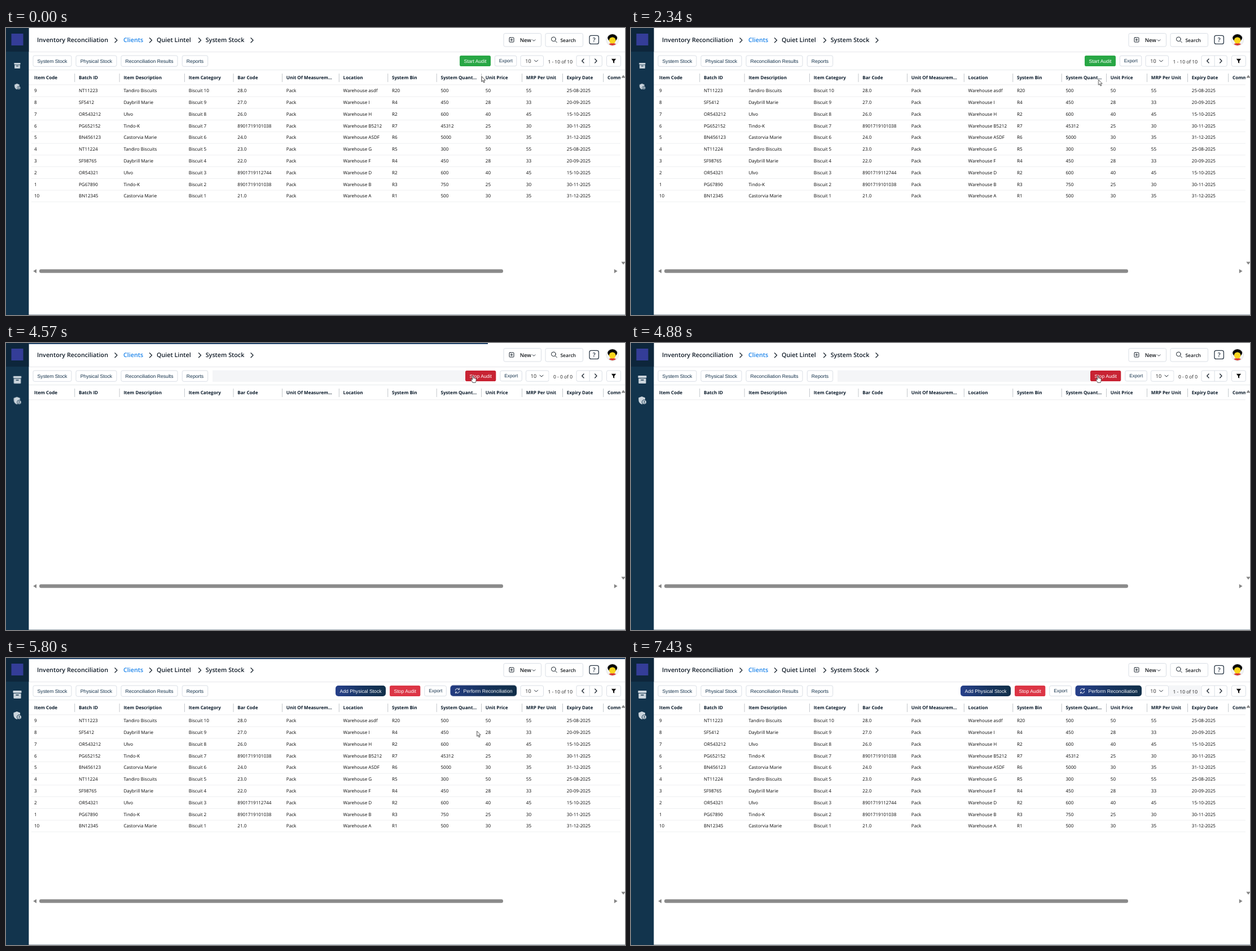
An HTML page for the animation above (7.99 s loop, 1097 by 510 pixels).

```html
<!DOCTYPE html>
<html lang="en">
<head>
<meta charset="utf-8">
<title>Inventory Reconciliation</title>
<style>
html, body { margin: 0; width: 100%; height: 100%; overflow: hidden; background: #fff; }
svg { display: block; width: 100vw; height: 100vh; }
text { font-family: "Open Sans", "Noto Sans", sans-serif; text-rendering: geometricPrecision; fill: #14181c; white-space: pre; }
.cell { font-size: 8.08px; font-weight: 500; fill: #080808; }
.head { font-size: 8.1px; font-weight: 700; fill: #0a1a2a; }
.crumb { font-size: 10.78px; font-weight: 600; fill: #0f1a26; }
.link { fill: #1c84ea; }
.new { font-size: 9.4px; font-weight: 600; }
.search { font-size: 8.5px; font-weight: 600; }
.help { font-size: 11px; font-weight: 600; fill: #2b3947; text-anchor: middle; }
.count { font-size: 8.45px; fill: #222; }
.size { font-size: 9px; fill: #222; text-anchor: middle; }
.btn, .btn-s { font-family: "Liberation Sans", Arial, sans-serif; font-size: 8.67px; text-anchor: middle; fill: #12304a; }
.btn-s { font-size: 8.3px; }
.lit { fill: #fff; }
.end { text-anchor: end; }
.box { fill: #fff; stroke: #d5dbe2; stroke-width: .9; }
.ico { fill: none; stroke: #1c2630; stroke-width: 1.3; stroke-linecap: round; stroke-linejoin: round; }
.thin { stroke-width: 1; }

.idle, .empty, .audit, .rows, .hand, .arrow, .ring, .patch { animation: 7990ms step-end infinite; }
.idle { animation-name: idle; }
.empty { animation-name: empty; }
.audit { animation-name: audit; }
.rows { animation-name: rows; }
.hand { animation-name: hand; }
.arrow { animation-name: arrow; }
.ring { animation-name: ring; }
.patch { animation-name: patch; }
.start { animation: start 7990ms linear infinite; }
.cursor { animation: cursor 7990ms linear infinite; }
.bar { transform-origin: 40px 0; animation: bar 7990ms linear infinite; }
.shift { animation: shift 7990ms step-end infinite; }
.export { animation: export 7990ms step-end infinite; }
.lift { animation: lift 7990ms linear infinite; }
.dim { animation: dim 7990ms linear infinite; }
.icon { animation: grow 7990ms ease-in-out infinite; }

@keyframes idle { 0% { visibility: visible } 56.32%, 100% { visibility: hidden } }
@keyframes empty { 0% { visibility: hidden } 56.32% { visibility: visible } 62.08%, 100% { visibility: hidden } }
@keyframes audit { 0% { visibility: hidden } 62.08%, 100% { visibility: visible } }
@keyframes rows { 0% { visibility: visible } 56.32% { visibility: hidden } 62.08%, 100% { visibility: visible } }
@keyframes ring { 0% { visibility: hidden } 48.94% { visibility: visible } 56.32%, 100% { visibility: hidden } }
@keyframes patch { 0% { visibility: hidden } 74.34%, 100% { visibility: visible } }
@keyframes shift { 0% { transform: none } 56.32% { transform: translateX(9.5px) } 62.08%, 100% { transform: none } }
@keyframes export { 0% { transform: none } 56.32% { transform: translateX(9.5px) } 62.08%, 100% { transform: translateX(-124.5px) } }
@keyframes hand {
  0% { visibility: hidden } 2.38% { visibility: visible } 7.38% { visibility: hidden }
  31.79% { visibility: visible } 71.7%, 100% { visibility: hidden }
}
@keyframes arrow {
  0% { visibility: visible } 2.38% { visibility: hidden } 7.38% { visibility: visible }
  31.79% { visibility: hidden } 71.7%, 100% { visibility: visible }
}
@keyframes start {
  0%, 2.3% { fill: #28a745 } 3.3%, 7.3% { fill: #218838 } 9.2%, 31.7% { fill: #28a745 }
  33.5%, 100% { fill: #218838 }
}
@keyframes cursor {
  0%, .63% { transform: translate(843px, 86px) }
  3.25%, 6.63% { transform: translate(833px, 60px) }
  9.26%, 28.91% { transform: translate(829px, 99px) }
  29.29% { transform: translate(828.5px, 92px) }
  33.54%, 71.46% { transform: translate(827.5px, 58px) }
  72.59% { transform: translate(834.5px, 129.5px) }
  74.34%, 80.1% { transform: translate(838px, 168px); animation-timing-function: ease-in-out }
  86.11%, 89.49% { transform: translate(980px, 481px) }
  92.86%, 100% { transform: translate(1052px, 513px) }
}
@keyframes bar {
  0%, 51.31% { transform: scaleX(0); opacity: 1 }
  56.32% { transform: scaleX(.7); opacity: 1 }
  60% { transform: scaleX(.99); opacity: 1 }
  60.8% { transform: scaleX(.99); opacity: 0 }
  60.81%, 61.7% { transform: scaleX(0); opacity: 1 }
  63.95% { transform: scaleX(.313); opacity: 1 }
  67.5% { transform: scaleX(.72); opacity: 1 }
  71.09% { transform: scaleX(.99); opacity: 1 }
  71.84%, 73.2% { transform: none; opacity: 1 }
  74.34%, 100% { transform: none; opacity: 0 }
}
@keyframes lift {
  0%, 62.08% { transform: none; filter: drop-shadow(0 0 0 #27408b00) }
  63.6%, 71.7% { transform: translateY(-1px); filter: drop-shadow(0 3px 4px #27408b80) }
  73%, 100% { transform: none; filter: drop-shadow(0 0 0 #27408b00) }
}
@keyframes dim { 0%, 62.08% { opacity: 0 } 63.6%, 71.7% { opacity: .35 } 73%, 100% { opacity: 0 } }
@keyframes grow {
  0%, 53.8% { transform: translateY(2px) scale(.74) }
  58.8%, 100% { transform: none }
}
</style>
</head>
<body>
<svg id="stage" viewBox="0 0 1097 510" preserveAspectRatio="none"></svg>
<script>
const text = (x, y, s, cls) => `<text x="${x}" y="${y}" class="${cls}">${s}</text>`;
const rect = (x, y, w, h, attrs) => `<rect x="${x}" y="${y}" width="${w}" height="${h}" ${attrs}/>`;
const path = (d, attrs = 'class="ico"') => `<path d="${d}" ${attrs}/>`;
const group = (cls, body) => `<g class="${cls}">${body}</g>`;
const box = (x, y, w, h) => rect(x, y, w, h, 'rx="2.8" class="box"');
const button = (x, w, s) => box(x, 49, w, 19.3) + text(x + w / 2, 61.7, s, 'btn');
const solid = (x, w, s, attrs) => rect(x, 49, w, 19, attrs) + text(x + w / 2, 61.6, s, 'btn lit');
const right = (x, y) => path(`M${x - 2} ${y - 4}l4 4l-4 4`);
const down = (x, y, r) => path(`M${x - r} ${y - r / 2}l${r} ${r}l${r} ${-r}`, 'class="ico thin"');

const columns = [
  [50, 'Item Code'], [129, 'Batch ID'], [208.4, 'Item Description'], [323.7, 'Item Category'],
  [410.3, 'Bar Code'], [496.8, 'Unit Of Measurem...'], [597.6, 'Location'], [684, 'System Bin'],
  [770.5, 'System Quant...'], [849.8, 'Unit Price'], [921.8, 'MRP Per Unit'], [993.8, 'Expiry Date'], [1066, 'Comments']
];
const products = {
  NT: ['Tandiro Biscuits', 50, 55, '25-08-2025'],
  SF: ['Daybrill Marie', 28, 33, '20-09-2025'],
  OR: ['Ulvo', 40, 45, '15-10-2025'],
  PG: ['Tindo-K', 25, 30, '30-11-2025'],
  BN: ['Castorvia Marie', 30, 35, '31-12-2025']
};
// item, batch, bar code, warehouse, bin, quantity
const stock = [
  '9 NT11223 28.0 asdf R20 500', '8 SF5412 27.0 I R4 450', '7 OR543212 26.0 H R2 600',
  '6 PG652152 8901719101038 B5212 R7 45312', '5 BN456123 24.0 ASDF R6 5000',
  '4 NT11224 23.0 G R5 300', '3 SF98765 22.0 F R4 450', '2 OR54321 8901719112744 D R2 600',
  '1 PG67890 8901719101038 B R3 750', '10 BN12345 21.0 A R1 500'
];

function tableHead() {
  const cells = columns.map(([x, s], i) =>
    text(x, 91.1, s, 'head') + (i ? rect(x - 7.8, 81, 1, 15, 'fill="#c3c7cb"') : '')).join('');
  return `<g clip-path="url(#table)">${cells}</g>` + rect(40, 100.5, 1049, .8, 'fill="#e6e8ea"');
}

function tableRow(line, i) {
  const [item, batch, code, place, bin, qty] = line.split(' ');
  const [name, price, mrp, date] = products[batch.slice(0, 2)];
  const cells = [item, batch, name, 'Biscuit ' + (10 - i), code, 'Pack', 'Warehouse ' + place, bin, qty, price, mrp, date];
  const y = 114.4 + i * 20.77;
  return cells.map((s, c) => text(columns[c][0], y, s, 'cell')).join('')
    + rect(45, y + 7.2, 1044, .8, 'fill="#e9ebed"');
}

const defs = `<defs>
  <clipPath id="table"><rect x="40" y="75" width="1049" height="30"/></clipPath>
  <clipPath id="face"><circle cx="1074.7" cy="21" r="10"/></clipPath>
  <linearGradient id="navy"><stop stop-color="#27408b"/><stop offset=".55" stop-color="#17345f"/><stop offset="1" stop-color="#12304a"/></linearGradient>
</defs>`;

const icon = (x, y, body) => `<g transform="translate(${x} ${y})">${group('icon', body)}</g>`;
const sidebar = rect(0, 0, 40.4, 510, 'fill="#12344d"') + rect(0, 0, 40.4, 42, 'fill="#0d263b"')
  + rect(9.5, 10, 21, 21, 'fill="#343d98"')
  + icon(20, 65, rect(-7.5, -7, 15, 4, 'rx=".8" fill="#cbd5dd"')
    + path('M-6.6 -2H6.6V6Q6.6 7 5.6 7H-5.6Q-6.6 7 -6.6 6Z', 'fill="#cbd5dd"')
    + rect(-2.6, 0, 5.2, 1.5, 'fill="#12344d"'))
  + icon(20, 102, path('M-.8 -7L5 -4.8V-1Q5 4.7 -.8 7Q-6.6 4.7 -6.6 -1V-4.8Z', 'fill="#cbd5dd"')
    + '<circle cx="3.6" cy="3" r="4" fill="#cbd5dd" stroke="#12344d"/><circle cx="3.6" cy="2" r="1.1" fill="#12344d"/>'
    + path('M1.6 5Q3.6 2.8 5.6 5Z', 'fill="#12344d"'));

const avatar = '<circle cx="1074.7" cy="21" r="11" fill="#f4f4f4" stroke="#dfe3e7" stroke-width=".8"/><g clip-path="url(#face)">'
  + '<ellipse cx="1074.7" cy="17.5" rx="8.5" ry="6.8" fill="#090909"/><ellipse cx="1074.7" cy="22" rx="5.8" ry="6" fill="#f9d51e"/>'
  + path('M1068.5 19Q1074.7 13.5 1081 19V15H1068.5Z', 'fill="#090909"')
  + path('M1066 32Q1068 26.5 1074.7 27.5Q1081.5 26.5 1083.5 32Z', 'fill="#d8342b"') + '</g>';

const header = text(55, 24.6, 'Inventory Reconciliation', 'crumb') + text(208, 24.6, 'Clients', 'crumb link')
  + text(267, 24.6, 'Quiet Lintel', 'crumb') + text(353.7, 24.6, 'System Stock', 'crumb')
  + [195, 256.5, 343.5, 436].map(x => right(x, 21.8)).join('')
  + box(882, 9.5, 66.5, 23.5) + rect(892, 17, 8, 8, 'rx="1" class="ico thin"')
  + path('M894 21h4M896 19v4', 'class="ico thin"')
  + text(910.7, 24.8, 'New', 'new') + down(935.5, 22, 2.4)
  + box(956, 9.5, 66.5, 23.5) + '<circle cx="970.3" cy="19.8" r="3.8" class="ico thin"/>'
  + path('M973.1 22.6l3.2 3.2', 'class="ico thin"') + text(982.4, 24.5, 'Search', 'search')
  + rect(1034, 13.4, 16.4, 15, 'rx="3" class="ico" style="stroke:#2b3947"')
  + text(1042.2, 24.9, '?', 'help') + avatar
  + rect(40, 42, 1057, .9, 'fill="#e2e5e8"');

const refresh = path('M796.3 57.6A3.7 3.7 0 0 1 803 56M803.3 54v2.3h-2.3M803.6 59.4A3.7 3.7 0 0 1 796.9 61M796.6 63v-2.3h2.3',
  'class="ico" style="stroke:#fff;stroke-width:.9"');

const toolbar = button(48, 68, 'System Stock') + button(124, 72, 'Physical Stock')
  + button(204, 100, 'Reconciliation Results') + button(312.3, 45.4, 'Reports')
  + group('patch', rect(953, 48.5, 57, 20, 'fill="#f5f6f8"'))
  + group('idle', solid(804, 55, 'Start Audit', 'rx="2.8" class="start"')
    + group('ring', rect(803.9, 48.8, 55.4, 19.4, 'rx="2.8" fill="none" stroke="#2a57a5" stroke-width="1.3"')))
  + group('empty', rect(366, 48.5, 448, 20.5, 'fill="#f4f5f7"') + solid(814, 54.3, 'Stop Audit', 'rx="2.8" fill="#c82333"'))
  + group('audit', solid(584, 89, 'Add Physical Stock', 'rx="5" fill="url(#navy)"')
    + solid(680, 54.3, 'Stop Audit', 'rx="2.8" fill="#dc3545"')
    + group('lift', rect(787.5, 48.7, 117.5, 19.2, 'rx="5" fill="url(#navy)"')
      + rect(787.5, 48.7, 117.5, 19.2, 'rx="5" fill="#0a2238" class="dim"')
      + refresh + text(854, 61.5, 'Perform Reconciliation', 'btn lit')))
  + group('export', box(866.3, 49.3, 38.5, 18.4) + text(885.7, 61.2, 'Export', 'btn-s'))
  + group('shift', box(912, 49, 40.5, 19.2) + text(925.4, 61.7, '10', 'size') + down(939.5, 58.6, 3))
  + group('rows', text(1004, 62.6, '1 - 10 of 10', 'count end'))
  + group('empty', text(1004, 62.6, '0 - 0 of 0', 'count end'))
  + box(1011, 49, 45.3, 19.2) + rect(1033.7, 49, .9, 19.2, 'fill="#d5dbe2"')
  + path('M1024 55l-3.3 3.5l3.3 3.5M1043.7 55l3.3 3.5l-3.3 3.5')
  + box(1064.5, 49, 25, 19.2) + path('M1072.8 54.8h8.4l-3.1 4v4l-2.2-1.2v-2.8Z', 'fill="#111"')
  + rect(40, 74, 1057, .8, 'fill="#e2e5e8"');

const scrollbars = rect(59, 428.8, 822, 6.4, 'rx="3.2" fill="#8b8b8b"')
  + path('M54 428.5v7.2l-5.8-3.6ZM1077.8 428.5v7.2l5.8-3.6ZM1090.3 88.4h7.4l-3.7-5ZM1090.3 415.6h7.4l-3.7 5Z', 'fill="#858585"');

const cursor = group('cursor',
  group('arrow', path('M0 0V9.3L2.1 7.4L3.7 11L5.2 10.3L3.7 6.9H6.6Z', 'fill="#fff" stroke="#222" stroke-width=".8"'))
  + group('hand', path('M-1 1Q0 -.6 1 1V4.4Q2 3.6 2.8 4.7Q3.8 4 4.4 5.1Q5.8 4.8 5.8 6.3V8.6Q5.7 10 4.7 11.2V12.4H-.7V11.3Q-2.5 9.5 -3.7 7Q-3.3 5.4 -1.9 6.5L-1 7.4Z',
    'fill="#fff" stroke="#222" stroke-width=".8" stroke-linejoin="round"')));

document.getElementById('stage').innerHTML = defs + rect(0, 0, 1097, 510, 'fill="#fff"')
  + header + toolbar + tableHead() + group('rows', stock.map(tableRow).join('')) + scrollbars
  + rect(40, 509, 1057, 1, 'fill="#9aa7b0"') + sidebar
  + rect(40, 0, 1057, 1.9, 'fill="#173a63" class="bar"') + cursor;
</script>
</body>
</html>
```
